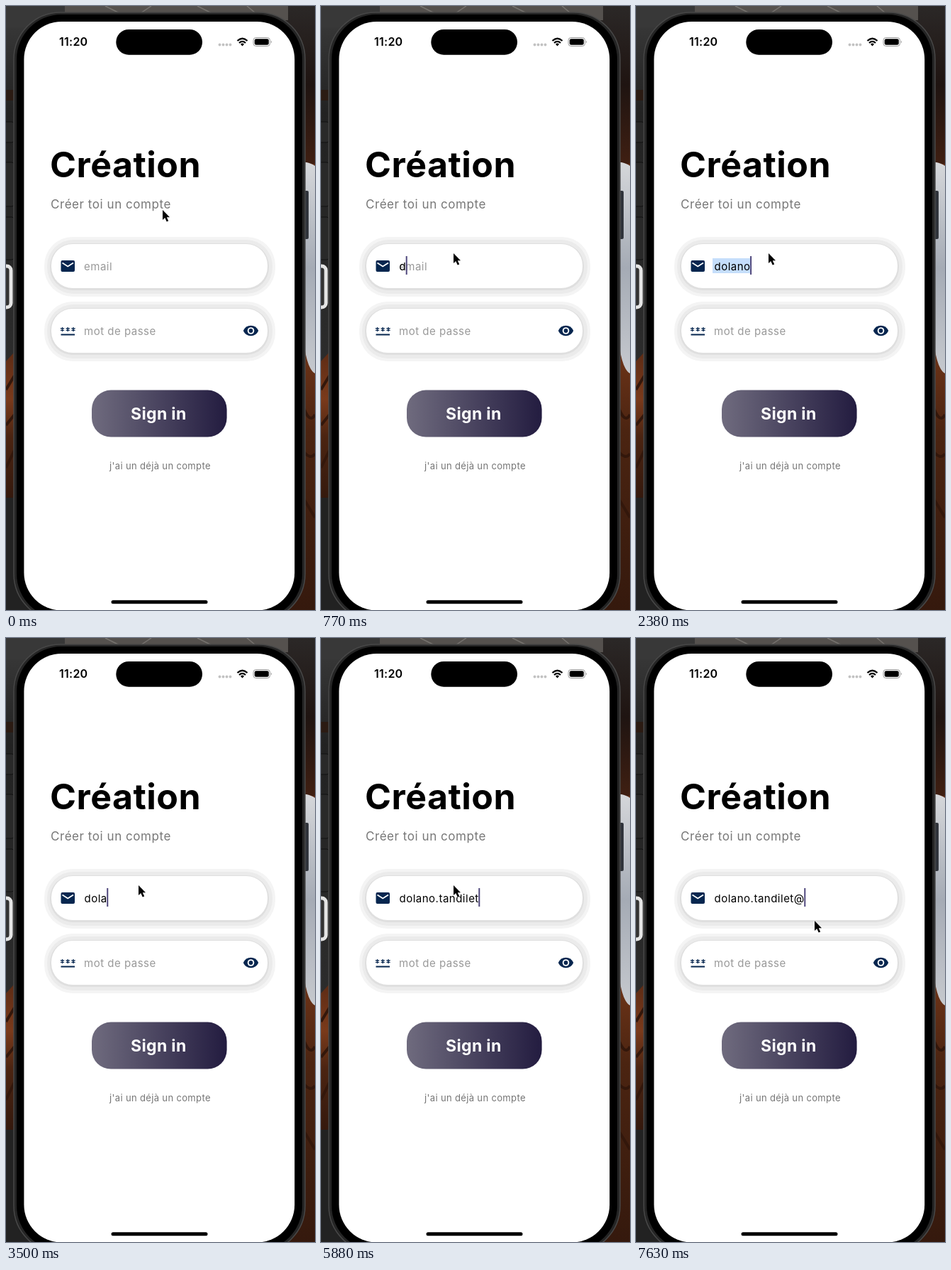
Animation of 436x850 px, one loop 8000 ms. Source, as an HTML page:

```html
<!DOCTYPE html>
<html lang="fr">
<head>
<meta charset="utf-8">
<style>
html, body { margin: 0; width: 100%; height: 100%; overflow: hidden; background: #222; }
svg { display: block; width: 436px; height: 850px; font-family: Inter, Roboto, sans-serif; }
.field { font-size: 15px; letter-spacing: .5px; }
.hint { fill: #999; }
.navy { fill: #06264f; }
</style>
</head>
<body>
<svg viewBox="0 0 436 850">
  <defs>
    <linearGradient id="wood" x2="0" y2="1">
      <stop offset="0" stop-color="#5a2a14"/><stop offset=".35" stop-color="#7a3a1b"/>
      <stop offset=".6" stop-color="#4b2411"/><stop offset="1" stop-color="#35190d"/>
    </linearGradient>
    <linearGradient id="shade" x2="0" y2="1">
      <stop offset="0" stop-color="#2b2827"/><stop offset=".5" stop-color="#1f1411"/><stop offset="1" stop-color="#3f1f12"/>
    </linearGradient>
    <linearGradient id="desk" x2="0" y2="1">
      <stop offset="0" stop-color="#3b3b3b"/><stop offset=".3" stop-color="#222"/><stop offset="1" stop-color="#2c2c2c"/>
    </linearGradient>
    <linearGradient id="paper" x2="0" y2="1">
      <stop offset="0" stop-color="#d5d7da"/><stop offset=".5" stop-color="#a5abb5"/><stop offset="1" stop-color="#c6c9ce"/>
    </linearGradient>
    <linearGradient id="button">
      <stop offset="0" stop-color="#6f6b7e"/><stop offset="1" stop-color="#231c40"/>
    </linearGradient>
    <g id="pill">
      <rect x="54" y="325" width="326" height="84" rx="40" fill="#f4f4f4"/>
      <rect x="58" y="329" width="318" height="76" rx="37" fill="#ebebeb"/>
      <rect x="62" y="334" width="309" height="66" rx="32" fill="#dfdfdf"/>
      <rect x="64" y="335" width="305" height="62" rx="30" fill="#fff"/>
    </g>
    <path id="star" d="M0-3V3M-2.6-1.5 2.6 1.5M-2.6 1.5 2.6-1.5" stroke="#06264f" stroke-width="1.4"/>
  </defs>

  <!-- desk behind the phone -->
  <rect width="60" height="500" fill="url(#desk)"/>
  <rect width="60" height="15" y="118" fill="#2b1b13"/>
  <rect id="mark" y="224" width="2" height="6" fill="#ddd"/>
  <g fill="#292929" stroke="#111">
    <rect x="-20" y="163" width="31" height="29" rx="3"/>
    <rect x="-20" y="220" width="31" height="62" rx="3"/>
    <rect x="-20" y="297" width="31" height="60" rx="3"/>
  </g>
  <rect x="-30" y="366" width="37" height="58" rx="6" fill="#333" stroke="#e4e4e4" stroke-width="5"/>
  <path d="M0 500 20 478V692H0Z" fill="url(#wood)"/>
  <rect y="692" width="70" height="158" fill="#222"/>
  <rect x="366" width="70" height="222" fill="url(#shade)"/>
  <rect x="366" y="222" width="70" height="628" fill="url(#wood)"/>
  <path d="M418 560Q428 590 436 575M418 625Q430 640 436 630M418 690 436 720M0 540 12 520M0 590 12 575M0 650 12 625" fill="none" stroke="#33170b" stroke-width="4"/>
  <path d="M400 220H424Q432 222 436 225V517Q426 512 421 480H400Z" fill="url(#paper)"/>
  <rect width="83" height="30" fill="#383838"/>
  <rect x="83" width="315" height="20" fill="#55514e"/>
  <path d="M140 0 160 10M205 0 190 10M270 0 290 10M340 0 352 10" stroke="#77736f" stroke-width="1.5"/>

  <!-- phone -->
  <rect x="420" y="260" width="7" height="68" rx="2" fill="#30343b"/>
  <rect x="11" y="9" width="411" height="856" rx="66" fill="#252525" stroke="#484848" stroke-width="1.5"/>
  <rect x="15" y="12" width="403" height="850" rx="63"/>
  <rect x="25.4" y="22" width="381.8" height="828.5" rx="53" fill="#fff"/>
  <rect x="155.3" y="33" width="121.7" height="35.7" rx="17.8"/>
  <text x="75" y="56" font-size="16" font-weight="600" letter-spacing=".25">11:20</text>
  <g fill="#c2c2c2">
    <circle cx="301.5" cy="54.5" r="1.9"/><circle cx="306.5" cy="54.5" r="1.9"/>
    <circle cx="311.5" cy="54.5" r="1.9"/><circle cx="316.5" cy="54.5" r="1.9"/>
  </g>
  <path d="M326.5 49Q333.5 42.5 340.5 49M329 52Q333.5 47.8 338 52" fill="none" stroke="#000" stroke-width="2.3"/>
  <path d="M331 53.7Q333.5 51.5 336 53.7L333.5 56.5Z"/>
  <rect x="349" y="44.5" width="23.5" height="12" rx="3.8" fill="none" stroke="#999"/>
  <rect x="350.7" y="46.2" width="20.1" height="8.6" rx="2.4"/>
  <path d="M374 48.5Q376 50.5 374 52.5Z" fill="#999"/>

  <!-- form -->
  <text x="62" y="241" font-size="50" font-weight="700" letter-spacing=".5">Création</text>
  <text x="63" y="285" font-size="17" letter-spacing=".55" fill="#777">Créer toi un compte</text>
  <use href="#pill"/>
  <use href="#pill" y="91"/>
  <rect class="navy" x="77.5" y="358" width="19.5" height="16" rx="2"/>
  <path d="M79.5 361.5 87.2 366.5 95 361.5" fill="none" stroke="#fff" stroke-width="1.8"/>
  <use href="#star" x="79.5" y="455"/><use href="#star" x="87.2" y="455"/><use href="#star" x="95" y="455"/>
  <rect class="navy" x="77.5" y="461.5" width="19.5" height="2"/>
  <path class="navy" d="M334.8 457Q338 449.7 345.5 449.7T356.2 457Q353 464.3 345.5 464.3T334.8 457Z"/>
  <circle cx="345.5" cy="457" r="4.8" fill="#fff"/>
  <circle class="navy" cx="345.5" cy="457" r="2.9"/>
  <text class="field hint" x="110" y="463">mot de passe</text>
  <text class="field hint" x="110" y="372" id="hint">email</text>
  <rect id="selection" x="108" y="355" height="21" fill="#c5defb"/>
  <text class="field" x="110.5" y="372" id="typed"></text>
  <rect id="caret" y="352" width="2" height="26" fill="#4f477c"/>
  <rect x="121" y="540.6" width="190.6" height="66" rx="27" fill="url(#button)"/>
  <text x="176" y="582" font-size="23" font-weight="700" letter-spacing=".35" fill="#fff">Sign in</text>
  <text x="146" y="652" font-size="13" letter-spacing=".35" fill="#757575">j'ai un déjà un compte</text>
  <rect x="148.5" y="836.2" width="136" height="5" rx="2.5"/>

  <path id="mouse" d="M0 0V14L3.2 11.1 5.7 16.5 8.2 15.4 5.8 10.2H10Z" stroke="#fff" stroke-width="1" paint-order="stroke"/>
</svg>
<script>
const LOOP = 8000, STEP = 70;
const el = id => document.getElementById(id);
const show = (id, on) => el(id).style.display = on ? "" : "none";

const edits = [
  [0, ""], [770, "d"], [840, "do"], [1190, "dol"], [1540, "dola"], [1820, "dolan"], [2030, "dolano"],
  [2730, "dolair"], [3220, "dolai"], [3500, "dola"], [3990, "dolan"], [4130, "dolano"], [4620, "dolano."]
];
const name = "dolano.tandilet@";
[4900, 5040, 5180, 5390, 5530, 5670, 5740, 5880, 7560].forEach((at, i) => edits.push([at, name.slice(0, 8 + i)]));

// time, x, y of the pointer tip
const path = [
  [0, 221, 287], [490, 187, 348], [6580, 187, 348], [6860, 202, 347],
  [7070, 230, 331], [7280, 257, 362], [7490, 252, 398], [LOOP, 252, 398]
];

function pointer(t) {
  const i = path.findIndex(p => p[0] > t);
  const [t0, x0, y0] = path[i - 1], [t1, x1, y1] = path[i];
  const k = (t - t0) / (t1 - t0), e = k * k * (3 - 2 * k);
  return [x0 + (x1 - x0) * e, y0 + (y1 - y0) * e];
}

function draw(now) {
  const t = Math.floor(now % LOOP / STEP + 1e-6) * STEP;
  const text = edits.filter(e => e[0] <= t).pop()[1];
  el("typed").textContent = text;
  const end = 110.5 + (text ? el("typed").getComputedTextLength() : 0);
  el("caret").setAttribute("x", end - .5);
  el("selection").setAttribute("width", end - 108);
  show("caret", t >= 490 && t < 6090 || t >= 7560);
  show("selection", t >= 2380 && t < 2660);
  show("hint", t < 840);
  show("mark", t < 280);
  el("mouse").setAttribute("transform", `translate(${pointer(t)})`);
  requestAnimationFrame(draw);
}
requestAnimationFrame(draw);
</script>
</body>
</html>
```
